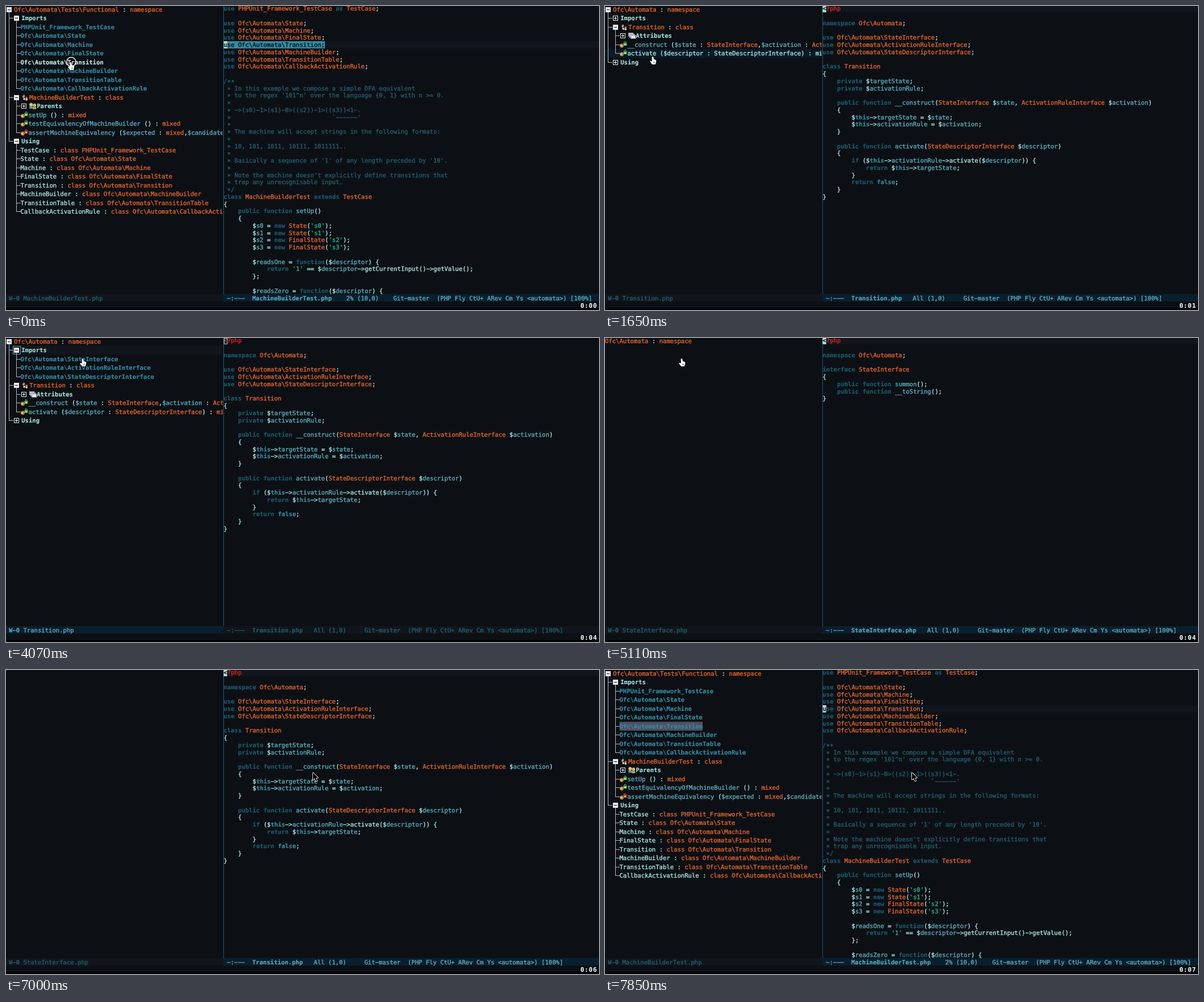
Animation of 1045 by 536 pixels, one loop 8 s. Source, as an HTML page with a canvas:

```html
<!DOCTYPE html>
<html lang="en">
<head>
<meta charset="utf-8">
<title>Code browser</title>
<style>
html, body { margin: 0; width: 100%; height: 100%; overflow: hidden; background: #0c1014; }
canvas { display: block; }
</style>
</head>
<body>
<canvas id="stage" width="1045" height="536"></canvas>
<script>
const ctx = document.getElementById('stage').getContext('2d');
const LOOP = 8000, SIZE = 10.595, COL = 6.377, SPLIT = 383.5, CODE_ROW = 12.75, TREE_ROW = 15.51;
const C = {
  bg: '#0c1014', line: '#11151c', bar: '#091f2e', dim: '#245b6b', mid: '#5aa9ba', light: '#a5dfdc',
  pale: '#c4e8e6', red: '#e0261c', orange: '#e0622c', blue: '#1b5b70', cyan: '#338ba4', green: '#2bb08d'
};
const raw = String.raw;

const files = {
  'MachineBuilderTest.php': { where: ' 2% (10,0)    ', cursor: 5, code: raw`use PHPUnit_Framework_TestCase as TestCase;

use Ofc\Automata\State;
use Ofc\Automata\Machine;
use Ofc\Automata\FinalState;
use Ofc\Automata\Transition;
use Ofc\Automata\MachineBuilder;
use Ofc\Automata\TransitionTable;
use Ofc\Automata\CallbackActivationRule;

/**
 * In this example we compose a simple DFA equivalent
 * to the regex '101^n' over the language {0, 1} with n >= 0.
 *
 * ~>(s0)-1>(s1)-0>((s2))-1>((s3))<1-.
 *                            ${'`'}------'
 *
 * The machine will accept strings in the following formats:
 *
 * 10, 101, 1011, 10111, 1011111..
 *
 * Basically a sequence of '1' of any length preceded by '10'.
 *
 * Note the machine doesn't explicitly define transitions that
 * trap any unrecognisable input.
 */
class MachineBuilderTest extends TestCase
{
    public function setUp()
    {
        $s0 = new State('s0');
        $s1 = new State('s1');
        $s2 = new FinalState('s2');
        $s3 = new FinalState('s3');

        $readsOne = function($descriptor) {
            return '1' == $descriptor->getCurrentInput()->getValue();
        };

        $readsZero = function($descriptor) {` },
  'Transition.php': { where: 'All (1,0)     ', cursor: 0, code: raw`<?php

namespace Ofc\Automata;

use Ofc\Automata\StateInterface;
use Ofc\Automata\ActivationRuleInterface;
use Ofc\Automata\StateDescriptorInterface;

class Transition
{
    private $targetState;
    private $activationRule;

    public function __construct(StateInterface $state, ActivationRuleInterface $activation)
    {
        $this->targetState = $state;
        $this->activationRule = $activation;
    }

    public function activate(StateDescriptorInterface $descriptor)
    {
        if ($this->activationRule->activate($descriptor)) {
            return $this->targetState;
        }
        return false;
    }
}` },
  'StateInterface.php': { where: 'All (1,0)     ', cursor: 0, code: raw`<?php

namespace Ofc\Automata;

interface StateInterface
{
    public function summon();
    public function __toString();
}` }
};

// Row: indent = depth, then box (- open, + shut, . none), kind letter, label.
const members = raw` -CTransition : class
  +AAttributes
  .M__construct ($state : StateInterface,$activation : ActivationRuleInterface) : mixed
  .Mactivate ($descriptor : StateDescriptorInterface) : mixed
 +HUsing`;
const trees = {
  blank: '',
  partial: '',
  machine: raw`-NOfc\Automata\Tests\Functional : namespace
 -HImports
  .LPHPUnit_Framework_TestCase
  .LOfc\Automata\State
  .LOfc\Automata\Machine
  .LOfc\Automata\FinalState
  .LOfc\Automata\Transition
  .LOfc\Automata\MachineBuilder
  .LOfc\Automata\TransitionTable
  .LOfc\Automata\CallbackActivationRule
 -CMachineBuilderTest : class
  +PParents
  .MsetUp () : mixed
  .MtestEquivalencyOfMachineBuilder () : mixed
  .RassertMachineEquivalency ($expected : mixed,$candidate : mixed) : mixed
 -HUsing
  .UTestCase : class PHPUnit_Framework_TestCase
  .UState : class Ofc\Automata\State
  .UMachine : class Ofc\Automata\Machine
  .UFinalState : class Ofc\Automata\FinalState
  .UTransition : class Ofc\Automata\Transition
  .UMachineBuilder : class Ofc\Automata\MachineBuilder
  .UTransitionTable : class Ofc\Automata\TransitionTable
  .UCallbackActivationRule : class Ofc\Automata\CallbackActivationRule`,
  collapsed: raw`-NOfc\Automata : namespace
 +HImports
` + members,
  expanded: raw`-NOfc\Automata : namespace
 -HImports
  .LOfc\Automata\StateInterface
  .LOfc\Automata\ActivationRuleInterface
  .LOfc\Automata\StateDescriptorInterface
` + members,
  state: raw`-NOfc\Automata : namespace
 -CStateInterface : interface
  .Msummon () : mixed
  .M__toString () : mixed`
};

const MACHINE = 'MachineBuilderTest.php', TRANSITION = 'Transition.php', STATE = 'StateInterface.php';
const hand = (x, y) => ({ x, y, hand: true });
const arrow = (x, y) => ({ x, y, hand: false });

// Each entry changes part of the state from its time on.
const timeline = [
  [0, { tree: 'machine', label: MACHINE, file: MACHINE, left: false, pulse: true, hover: 6, lit: -1, selected: -1, ring: true, seconds: 0, mouse: hand(114, 99) }],
  [150, { ring: false }],
  [450, { file: TRANSITION, pulse: false, hover: -1, selected: 6 }],
  [600, { mouse: hand(108, 98) }],
  [750, { mouse: hand(98, 95) }],
  [900, { mouse: hand(90, 91) }],
  [1050, { mouse: hand(84, 89), seconds: 1 }],
  [1650, { tree: 'collapsed', label: TRANSITION, hover: 5, lit: 5, selected: -1 }],
  [1800, { mouse: hand(72, 74), hover: -1, lit: -1 }],
  [1950, { mouse: hand(50, 52) }],
  [2100, { mouse: arrow(28, 33) }],
  [2190, { mouse: arrow(16, 22) }],
  [2340, { mouse: arrow(12, 19) }],
  [2490, { tree: 'expanded', left: true, lit: 1, seconds: 2 }],
  [2790, { mouse: arrow(30, 24) }],
  [2920, { mouse: hand(60, 40) }],
  [3040, { mouse: hand(95, 48), hover: 3, seconds: 3 }],
  [3180, { mouse: hand(120, 51) }],
  [3480, { mouse: hand(132, 39), hover: 2 }],
  [3770, { mouse: hand(134, 38) }],
  [3920, { mouse: hand(135, 36), hover: -1, seconds: 4 }],
  [4210, { ring: true }],
  [4360, { ring: false, file: STATE, left: false, lit: -1 }],
  [5110, { tree: 'partial', label: STATE }],
  [5210, { tree: 'state', seconds: 5 }],
  [5510, { mouse: arrow(170, 55) }],
  [5650, { mouse: arrow(260, 90) }],
  [5800, { mouse: arrow(370, 130) }],
  [5950, { mouse: arrow(460, 160) }],
  [6100, { mouse: arrow(520, 176), seconds: 6 }],
  [6250, { mouse: arrow(541, 181) }],
  [7000, { tree: 'blank', file: TRANSITION }],
  [7150, { tree: 'partial', label: TRANSITION, seconds: 7 }],
  [7250, { tree: 'collapsed' }],
  [7550, { tree: 'blank', file: MACHINE }],
  [7850, { tree: 'machine', label: MACHINE, selected: 6 }]
];

function rect(x, y, w, h, color) {
  ctx.fillStyle = color;
  ctx.fillRect(x, y, w, h);
}

function frame(x, y, w, h, color) {
  ctx.strokeStyle = color;
  ctx.lineWidth = 1;
  ctx.strokeRect(x, y, w, h);
}

function disc(x, y, r, color) {
  ctx.fillStyle = color;
  ctx.beginPath();
  ctx.arc(x, y, r, 0, 7);
  ctx.fill();
}

function polygon(points, fill, stroke) {
  ctx.beginPath();
  points.forEach(([x, y]) => ctx.lineTo(x, y));
  ctx.closePath();
  ctx.lineWidth = 1.6;
  ctx.lineJoin = 'round';
  ctx.strokeStyle = stroke;
  ctx.stroke();
  ctx.fillStyle = fill;
  ctx.fill();
}

// Wide hyphens, centred asterisks and a thin outline give the terminal's heavier look.
function text(str, x, y, color, bold) {
  const glyphs = str.replaceAll('-', '\u2212').replaceAll('*', '\u2217');
  ctx.font = `${bold ? 'bold ' : ''}${SIZE}px "DejaVu Sans Mono", monospace`;
  ctx.fillStyle = ctx.strokeStyle = color;
  ctx.lineWidth = bold ? 0.15 : 0.4;
  ctx.lineJoin = 'round';
  ctx.fillText(glyphs, x, y);
  ctx.strokeText(glyphs, x, y);
}

function spans(list, x, y) {
  for (const [str, color, bold] of list) {
    text(str, x, y, color, bold);
    x += str.length * COL;
  }
}

const KEYWORDS = /^(namespace|use|class|interface|extends|as|private|public|function|new|if|return)$/;

function highlight(line) {
  if (/^\/\*| \*/.test(line.slice(0, 2))) return [[line, C.dim]];
  const out = [];
  let previous = '';
  for (const m of line.matchAll(/<\?php|'[^']*'|\$\w+|->\w+|[\w\\]+|\s+|./g)) {
    const tok = m[0], called = line[m.index + tok.length] === '(';
    if (tok === '<?php') out.push([tok, C.red]);
    else if (tok[0] === "'") out.push([tok, C.green]);
    else if (tok === '$this') out.push(['$', C.light], ['this', C.cyan, true]);
    else if (tok[0] === '$') out.push(['$', C.light], [tok.slice(1), C.mid]);
    else if (tok.startsWith('->')) out.push(['->', C.light], [tok.slice(2), called ? C.light : C.mid]);
    else if (KEYWORDS.test(tok)) out.push([tok, C.blue, true]);
    else if (tok === 'false') out.push([tok, C.cyan, true]);
    else if (previous === 'function') out.push([tok, /\w/.test(tok) ? C.mid : C.light]);
    else out.push([tok, /^[A-Z]/.test(tok) ? C.orange : C.light]);
    if (tok.trim()) previous = tok;
  }
  return out;
}

function labelSpans(kind, label, hovered) {
  if (kind === 'L') return [[label, hovered ? C.pale : C.cyan, true]];
  if (hovered) return [[label, C.light]];
  if ('HPA'.includes(kind)) return [[label, C.light, true]];
  if ('MR'.includes(kind)) {
    return label.match(/\$?\w+|[^\w$]+/g).map((tok, i) =>
      [tok, i === 0 || tok[0] === '$' ? C.mid : /\w/.test(tok) ? C.orange : C.light]);
  }
  const [name, type] = label.split(' : ');
  return [[name, kind === 'U' ? C.light : C.orange], [' : ', C.light], [type, C.orange]];
}

function icon(kind, x, y) {
  if (kind === 'C') {
    polygon([[x + 2, y - 1], [x + 4.5, y - 4.5], [x + 6, y - 2], [x + 4, y + 1]], '#c9a880', '#5c4632');
    disc(x + 5, y + 3, 1.8, '#eee3d2');
    disc(x + 9, y + 1, 1.8, '#d98b4a');
    disc(x + 9, y + 4, 1.8, '#e8e0d8');
  } else if (kind === 'P') {
    disc(x + 4, y - 2, 3, '#e6c860');
    rect(x + 1, y + 1, 6, 4, '#5d93c8');
    disc(x + 10, y - 1, 3, '#e0b070');
    rect(x + 7, y + 2, 6, 4, '#8fb35a');
  } else if (kind === 'A') {
    for (let i = 0; i < 3; i++) {
      rect(x + 1 + i * 2, y - 5 + i * 2, 9, 7, '#e4e8ec');
      frame(x + 1.5 + i * 2, y - 4.5 + i * 2, 8, 6, '#7e8a94');
    }
  } else {
    const mark = kind === 'M' ? '#52b84a' : '#d84335';
    disc(x + 4, y + 2, 3.4, '#c9814a');
    disc(x + 3, y + 2, 1.4, '#f0d3b0');
    rect(x + 7, y - 3, 6, 5, mark);
    frame(x + 8.5, y - 5, 3, 3, mark);
    rect(x + 9, y - 1, 2, 2, '#e8f2e2');
  }
}

function box(x, y, shut) {
  rect(x - 4, y - 4, 9, 9, '#e6eaee');
  rect(x - 2, y, 5, 1, '#0c1014');
  if (shut) {
    rect(x - 3, y - 3, 7, 7, '#0c1014');
    rect(x - 2, y, 5, 1, '#fff');
    rect(x, y - 2, 1, 5, '#fff');
  }
}

function drawTree(s) {
  ctx.save();
  ctx.beginPath();
  ctx.rect(0, 0, 382, 508);
  ctx.clip();
  if (s.tree === 'partial') spans(labelSpans('N', raw`Ofc\Automata : namespace`), 0, 8.5);
  const boxX = [5, 18, 31], parents = [];
  const rows = trees[s.tree].split('\n').filter(Boolean);
  if (s.lit >= 0) rect(0, s.lit * TREE_ROW - 1.7, 382, TREE_ROW, s.left ? C.line : '#0a1a26');
  rows.forEach((row, i) => {
    const depth = row.search(/\S/), marker = row[depth], kind = row[depth + 1];
    const y = Math.round(5.5 + i * TREE_ROW);
    parents[depth] = y;
    if (depth) {
      const x = boxX[depth - 1];
      rect(x, parents[depth - 1] + 5, 1, y - parents[depth - 1] - 4, '#b4b4c4');
      rect(x, y, 8, 1, '#b4b4c4');
    }
    if (marker !== '.') box(boxX[depth], y, marker === '+');
    let x = marker === '.' ? 25.5 : boxX[depth] + 9.2;
    if ('CPAMR'.includes(kind)) {
      icon(kind, x, y);
      x += 14;
    }
    const label = row.slice(depth + 2), top = i * TREE_ROW - 1.7;
    if (i === s.selected) rect(x, top, label.length * COL, TREE_ROW, '#4e5166');
    spans(labelSpans(kind, label, i === s.hover), x, 9.6 + i * TREE_ROW);
  });
  if (s.left) frame(12.5, 14.5, 13, 14, C.mid);
  ctx.restore();
}

function drawCode(s) {
  const { code, cursor } = files[s.file];
  const lines = code.split('\n'), top = cursor * CODE_ROW - 1.7;
  if (!s.left) rect(SPLIT, top, 1045 - SPLIT, CODE_ROW, C.line);
  if (s.pulse) rect(SPLIT, top, lines[cursor].length * COL, CODE_ROW, C.cyan);
  lines.forEach((line, i) => {
    const list = s.pulse && i === cursor ? [[line, C.bg]] : highlight(line);
    spans(list, SPLIT, 8.3 + i * CODE_ROW);
  });
  rect(383, 0, 1, 508, C.dim);
  if (s.left) {
    frame(384.5, 0.5, 5.5, 10, C.light);
  } else {
    rect(SPLIT, top, COL, CODE_ROW, C.light);
    text(lines[cursor][0], SPLIT, 8.3 + cursor * CODE_ROW, C.bg);
  }
}

function drawBars(s) {
  const ink = active => active ? C.mid : C.dim;
  rect(0, 508, 383, 13, s.left ? C.bar : C.line);
  rect(383, 508, 662, 13, s.left ? C.line : C.bar);
  spans([['W-0', ink(s.left), true], [' ' + s.label, ink(s.left)]], 5, 518.6);
  const color = ink(!s.left);
  spans([
    ['-:---  ', color], [s.file, color, true],
    ['   ' + files[s.file].where + 'Git-master  (PHP Fly CtU+ ARev Cm Ys <automata>) [100%]', color]
  ], 389.3, 518.6);
  rect(0, 533, 1045, 3, '#000');
  ctx.font = 'bold 11px "DejaVu Sans Mono", monospace';
  ctx.fillStyle = '#fff';
  ctx.textAlign = 'center';
  [...`0:0${s.seconds}`].forEach((ch, i) => ctx.fillText(ch, 1015.5 + i * 7.4, 531.6));
  ctx.textAlign = 'left';
}

const ARROW = [[0, 0], [0, 12.5], [3, 10], [5.2, 15], [7.2, 14], [5, 9.2], [9, 9]];
const HAND = [[-1.5, 1], [0, 0], [1.3, 1], [2, 5], [5.5, 6], [6.5, 8], [5.5, 12], [5, 14], [-1, 14], [-4.5, 9], [-4.5, 7.5], [-1, 8.5]];

function drawMouse({ mouse, ring }) {
  ctx.save();
  ctx.translate(mouse.x, mouse.y);
  if (mouse.hand) {
    polygon(HAND, '#fff', '#000');
    for (const x of [1, 3]) rect(x, 9, 0.8, 3, '#555');
  } else {
    polygon(ARROW, '#000', '#fff');
  }
  if (ring) {
    ctx.strokeStyle = '#fff';
    ctx.lineWidth = 1.4;
    ctx.beginPath();
    ctx.arc(1, -0.5, 8, 0, 7);
    ctx.stroke();
  }
  ctx.restore();
}

function draw(now) {
  const t = now % LOOP;
  const state = Object.assign({}, ...timeline.filter(([at]) => at <= t).map(([, patch]) => patch));
  ctx.textRendering = 'geometricPrecision';
  rect(0, 0, 1045, 536, C.bg);
  drawTree(state);
  drawCode(state);
  drawBars(state);
  drawMouse(state);
}

const start = performance.now();
function tick() {
  draw(performance.now() - start);
  requestAnimationFrame(tick);
}
tick();
</script>
</body>
</html>
```
